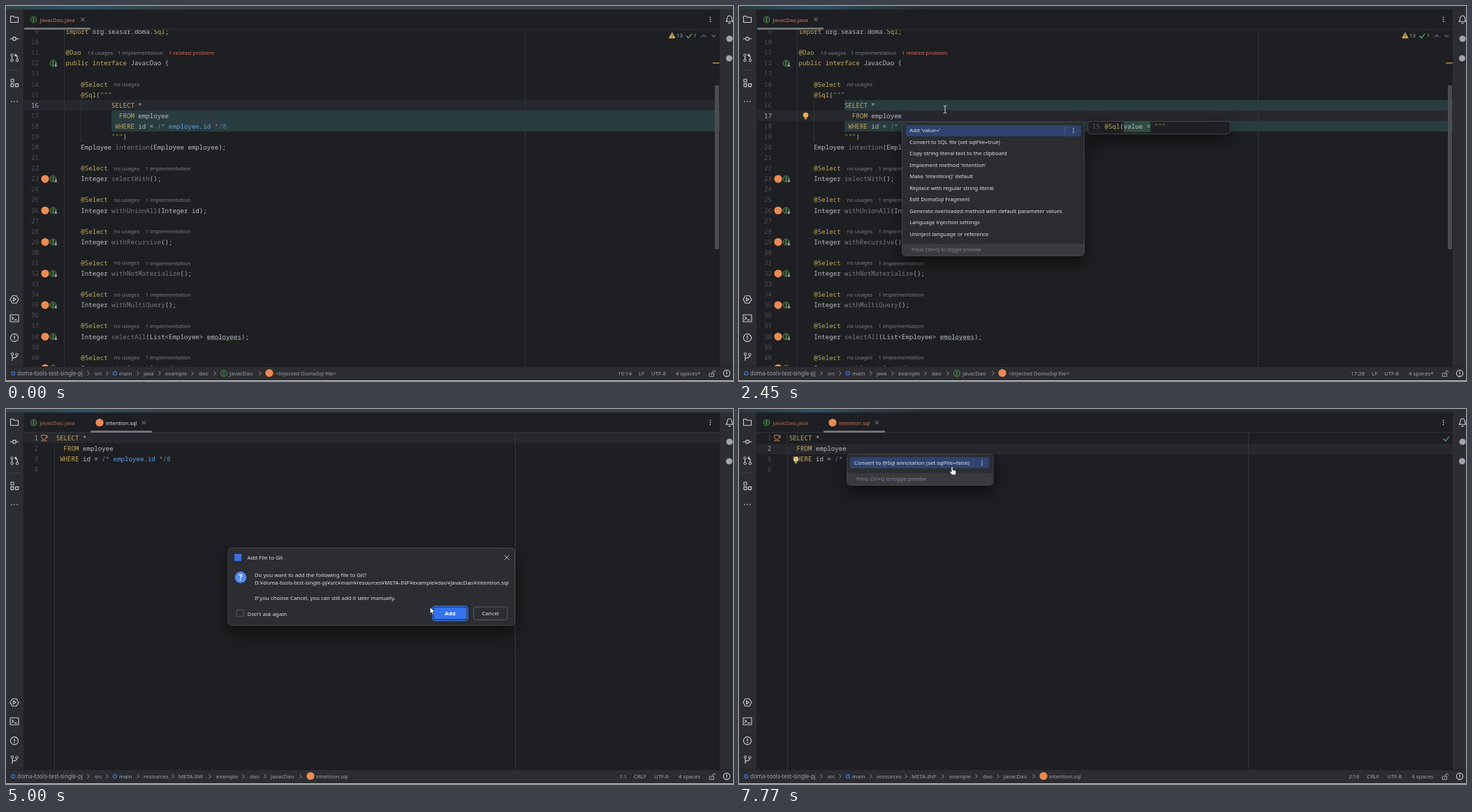
These frames come from a looping animation (1041x538 px, 8 s). An HTML page:

```html
<!DOCTYPE html>
<html lang="en">
<head>
<meta charset="utf-8">
<title>Editor: convert annotation to SQL file</title>
<style>
html, body { margin: 0; width: 100%; height: 100%; overflow: hidden; background: #1e1f22; }
svg { display: block; width: 100%; height: 100%; }
text { white-space: pre; font-family: "Noto Sans", "Open Sans", sans-serif; }
.mono { font-family: "Noto Sans Mono", "DejaVu Sans Mono", monospace; font-size: 9.12px; }
.shadow { filter: drop-shadow(0 10px 11px #0008); }
</style>
</head>
<body>
<svg id="stage" viewBox="0 0 1041 538" xmlns="http://www.w3.org/2000/svg"></svg>
<script>
const LOOP = 8000, PITCH = 15.083;
const BG = '#1e1f22', PANEL = '#2b2d30', EDGE = '#43454a', ROW = '#26282e', TEAL = '#293c3f',
  ICON = '#ced0d6', TEXT = '#dfe1e5', DIM = '#7b7f86', MUTED = '#a0a3ab', BLUE = '#3574f0',
  ORANGE = '#ee8a50', RED = '#cf7b68', GREEN = '#57965c', YELLOW = '#d6ae58';
const INK = { k: '#c8a95f', a: '#b9ab5c', s: '#9c9a5c', m: '#777a80', c: '#7a7e85', b: '#5b9fe6', n: '#4a86a8', d: '#bcbec4' };

const esc = s => s.replace(/&/g, '&amp;').replace(/</g, '&lt;');
const rect = (x, y, w, h, fill, r = 0, more = '') =>
  `<rect x="${x}" y="${y}" width="${w}" height="${h}" rx="${r}" fill="${fill}" ${more}/>`;
const box = (x, y, w, h, fill, stroke, r) => rect(x, y, w, h, fill, r, `stroke="${stroke}"`);
const path = (d, color = ICON, width = 1.1, fill = 'none') =>
  `<path d="${d}" fill="${fill}" stroke="${color}" stroke-width="${width}" stroke-linecap="round" stroke-linejoin="round"/>`;
const circle = (x, y, r, fill, stroke = 'none', width = 1, more = '') =>
  `<circle cx="${x}" cy="${y}" r="${r}" fill="${fill}" stroke="${stroke}" stroke-width="${width}" ${more}/>`;
const at = (x, y, body) => `<g transform="translate(${x} ${y})">${body}</g>`;
// Text is placed by its left end and its vertical middle.
const label = (x, y, s, fill = TEXT, size = 7.8, more = '') =>
  `<text x="${x}" y="${y + size * 0.36}" font-size="${size}" fill="${fill}" ${more}>${esc(s)}</text>`;
// Code spans: "k~keyword |plain |a~annotation"
const code = (x, y, s) => `<text class="mono" x="${x}" y="${y + 3.2}">` + s.split('|').map(part => {
  const [ink, words] = part.includes('~') ? part.split('~') : ['d', part];
  return `<tspan fill="${INK[ink]}">${esc(words)}</tspan>`;
}).join('') + '</text>';
const lineNo = (y, n, fill = '#4b5059', x = 47) =>
  `<text class="mono" x="${x}" y="${y + 3.2}" text-anchor="end" fill="${fill}">${n}</text>`;
// Shows its content only within the given "start-end" spans (ms).
const during = (spans, body) => `<g data-on="${spans}">${body}</g>`;

const cross = (x, y, r = 2.3, color = '#9da0a8') => path(`M${x - r} ${y - r}l${2 * r} ${2 * r}m0 ${-2 * r}l${-2 * r} ${2 * r}`, color, 0.9);
const chevron = (x, y) => path(`M${x - 1.3} ${y - 2.7}l2.6 2.7l-2.6 2.7`, '#9da0a8', 0.9);
const dots = (x, y, dx, dy, gap = 3) => [-gap, 0, gap].map(k => circle(x + k * dx, y + k * dy, 0.85, ICON)).join('');
const check = (x, y) => path(`M${x - 3.5} ${y}l2.6 2.8l4.8 -5.6`, '#57a75e', 1.3);
const badge = (x, y, r = 5.6) => circle(x, y, r, ORANGE);
const iface = (x, y) => circle(x, y, 4.4, '#253627', GREEN, 0.9) + path(`M${x - 1.1} ${y - 2}h2.2m-1.1 0v4m-1.1 0h2.2`, GREEN, 0.8);
const implemented = y => iface(67.5, y) + path(`M71.5 ${y}v4.5m-1.6 -1.6l1.6 1.6l1.6 -1.6`, ICON, 0.9);
const bulb = (x, y, color) => circle(x, y - 1, 3.8, color) + rect(x - 1.7, y + 2, 3.4, 2.9, color, 0.8) + path(`M${x - 1.5} ${y + 3.4}h3`, BG, 0.6);

function sideBars() {
  const left = [
    [19, path('M-5.5 -4.5h3.8l1.7 1.8h5.5v7.2h-11z')],
    [47, circle(0, 0, 2.4, 'none', ICON, 1.1) + path('M-6 0h3.4m5.2 0h3.4')],
    [74, circle(-3.5, -3.5, 1.7, 'none', ICON) + circle(-3.5, 4, 1.7, 'none', ICON) + circle(4, 4, 1.7, 'none', ICON) + path('M-3.5 -1.6v3.8m7.5 0v-3.5q0 -2.3 -3.2 -2.3m1.6 -1.7l-1.8 1.7l1.8 1.7')],
    [110, path('M-5 -5h4v4h-4zM-5 1.6h4v4h-4zM1.6 1.6h4v4h-4z')],
    [137, dots(0, 0, 1, 0, 4.2)],
    [421, path('M-3 -5.3h6l3 5.3l-3 5.3h-6l-3 -5.3zM-1.5 -2.4l3.8 2.4l-3.8 2.4z')],
    [448, path('M-6 -5h12v10h-12zM-3.5 -2l2.2 2l-2.2 2m3.7 .4h3')],
    [476, circle(0, 0, 5.6, 'none', ICON, 1.1) + path('M0 -2.9v3.4m0 2v.2', ICON, 1.3)],
    [503, circle(-3, -3.7, 1.7, 'none', ICON) + circle(3.4, -3, 1.7, 'none', ICON) + path('M-3 -2v7.5m6.4 -6.8q0 3.3 -6.4 3.3')]
  ];
  return rect(0, 5, 25, 512, PANEL) + rect(1022, 5, 19, 512, PANEL) +
    path('M4 92h15', EDGE, 1) + left.map(([y, icon]) => at(12, y, icon)).join('') +
    at(1036, 19, path('M-5 3.3h10q-1.7 -1.5 -1.7 -4.3q0 -4 -3.3 -4t-3.3 4q0 2.8 -1.7 4.3zM-1.2 5.6h2.4')) +
    circle(1036, 47, 4.6, MUTED) + circle(1035.5, 75, 4.6, MUTED) + dots(1008.5, 19.3, 0, 1);
}

function titleBar() {
  return `<linearGradient id="glow"><stop offset="0" stop-color="#2d4550" stop-opacity=".5"/><stop offset=".4" stop-color="#2d5162"/><stop offset="1" stop-color="#2d4550" stop-opacity="0"/></linearGradient>` +
    rect(0, 0, 1041, 5, PANEL) + during('0-600 3900-5280', rect(0, 0, 1041, 5, '#3b3e41')) + rect(0, 0, 270, 5, 'url(#glow)');
}

function underline(x, w, focused) {
  return rect(x, 31, w, 3, '#6f737a', 1) + during(focused, rect(x, 31, w, 3, BLUE, 1));
}

function javaEditor() {
  const row = n => 52 + PITCH * (n - 10), top = n => Math.round(row(n) - PITCH / 2), X = 85.5;
  const band = (n, x, fill) => rect(x, top(n), 1022 - x, top(n + 1) - top(n), fill);
  const lines = {
    9: 'k~import |org.seasar.doma.|a~Sql|;', 11: 'a~@Dao', 12: 'k~public interface |JavacDao {',
    14: 'a~    @Select', 15: 'a~    @Sql|(|s~"""', 16: 'k~            SELECT |*',
    17: 'k~              FROM |employee', 18: 'k~             WHERE |id = |c~/* |b~employee|.|b~id |c~*/|n~0',
    19: 's~            """|)', 20: '    Employee |m~intention|(Employee employee);'
  };
  const methods = ['selectWith|()', 'withUnionAll|(Integer id)', 'withRecursive|()', 'withNotMaterialize|()',
    'withMultiQuery|()', 'selectAll|(List<Employee> emoloyees)', 'withSearchQuery|()'];
  let out = [16, 17, 18].map(n => band(n, 151, TEAL)).join('') +
    during('0-650', band(16, 26, ROW)) + during('650-3780', band(17, 26, ROW)) +
    path('M83.5 34V517', '#313438', 1) + path('M743.5 34V517', '#36383d', 1) +
    path(`M107.5 ${top(16)}V${top(20)}`, '#313438', 1);
  for (let n = 9; n <= 41; n++) out += lineNo(row(n), n);
  out += during('0-650', lineNo(row(16), 16, MUTED)) + during('650-3780', lineNo(row(17), 17, MUTED));
  for (const n in lines) out += code(X, row(+n), lines[n]);
  out += label(116.5, row(11), '13 usages', DIM) + label(160, row(11), '1 implementation', DIM) +
    label(233, row(11), '1 related problem', '#db6a58') + label(154.5, row(14), 'no usages', DIM, 7.65) + implemented(row(12));
  methods.forEach((name, i) => {
    const n = 23 + 3 * i, y = row(n), above = row(n - 1);
    out += code(X, above, 'a~    @Select') + label(154.5, above, 'no usages', DIM, 7.65) +
      label(199.5, above, '1 implementation', DIM) + code(X, y, `    Integer |m~${name};`) + badge(56, y) + implemented(y);
  });
  out += path(`M288.5 ${row(38) + 5}` + 'l1.5 -1.4l1.5 1.4'.repeat(16), '#4f8f55', 0.8) +
    path('M954 38.6l4 7.3h-8z', YELLOW, 1, YELLOW) + path('M954 41v2.2m0 1.6v.1', BG, 0.9) + label(960, 42.5, '13', MUTED) +
    check(978, 43) + label(984.5, 42.5, '1', MUTED) + path('M996.5 44l2.6 -2.5l2.6 2.5M1010.7 41.8l2.6 2.5l2.6 -2.5', MUTED, 1) +
    rect(1012, 81, 9.5, 1.6, '#a98b45') + rect(1015, 114, 6, 235, '#4b4d50') +
    rect(26, 5, 996, 28, BG) + path('M26 33.5H1022', '#2f3135', 1) +
    iface(39.5, 19.5) + label(48.5, 20, 'JavacDao.java', RED) + cross(110, 19.5) + underline(26, 95, '600-1600') +
    during('650-1500', rect(233, top(17) + 1, 1, 13, ICON)) + during('1500-3780', bulb(95.5, row(17), '#f0ae4b'));
  return out;
}

function sqlEditor() {
  const row = n => 42 + PITCH * (n - 1);
  const current = (n, spans) => during(spans, rect(26, Math.round(row(n) - PITCH / 2), 996, 15, ROW) + lineNo(row(n), n, MUTED, 46));
  const lines = ['k~SELECT |*', 'k~  FROM |employee', 'k~ WHERE |id = |c~/* |b~employee|.|b~id |c~*/|n~0', ''];
  return rect(26, 5, 996, 512, BG) + lines.map((s, i) => lineNo(row(i + 1), i + 1, undefined, 46)).join('') +
    current(1, '3780-5980') + current(2, '5980-8000') +
    path('M69.5 34V517', '#313438', 1) + path('M729.5 34V517', '#36383d', 1) +
    lines.map((s, i) => code(71.7, row(i + 1), s)).join('') +
    during('4600-8000', path('M51 37.5h6.3v3.8q0 2.2 -2 2.2h-2.3q-2 0 -2 -2.2zM57.3 38.5h2v2.6h-2M50.5 45.5h7.5', '#c77d55', 1)) +
    during('5280-8000', check(1012.5, 43)) +
    path('M26 33.5H1022', '#2f3135', 1) +
    iface(39.5, 19.5) + label(48.5, 20, 'JavacDao.java', '#b06e60') + badge(134, 19.5) +
    during('3780-5280', label(143, 20, 'intention.sql', TEXT, 7.6)) + during('5280-8000', label(143, 20, 'intention.sql', RED, 7.6)) +
    cross(197.5, 19.5) + underline(121, 88, '3780-3900 5300-6890') +
    during('5300-5980', rect(71.5, 36, 1, 12, ICON)) + during('5980-6890', rect(154, 51, 1, 12, ICON));
}

function statusBar() {
  const y = 527, text = (x, s) => label(x, y, s, MUTED);
  const crumbs = (names, arrows) => names.map(([x, s]) => text(x, s)).join('') + arrows.map(x => chevron(x, y)).join('');
  const module = x => box(x, y - 2.3, 4.6, 4.6, '#25324d', '#548af7', 1);
  return rect(0, 517, 1041, 20, PANEL) + path('M0 517.5H1041', BG, 1) + rect(0, 537, 1041, 1, '#c4c6c8') +
    module(8) + label(16, y, 'doma-tools-test-single-pj', MUTED, 8) + module(153.5) +
    crumbs([[127, 'src'], [162, 'main']], [118, 145, 189]) +
    during('0-3780', crumbs([[197, 'java'], [228, 'example'], [276, 'dao'], [320, 'JavacDao'], [386, '<Injected DomaSql file>']],
      [220, 267, 299, 364]) + iface(312, y) + badge(377, y - 0.5)) +
    during('3780-8000', crumbs([[197, 'resources'], [247, 'META-INF'], [301, 'example'], [349, 'dao'], [379, 'JavacDao'], [444, 'intention.sql']],
      [239, 292, 340, 371, 422]) + badge(436, y - 0.5)) +
    during('0-650', text(876, '16:14')) + during('650-3780', text(876, '17:28')) + during('3780-4600', text(885.5, '1:1')) +
    during('4600-6080', text(878, '1:1')) + during('6080-8000', text(873, '2:16')) +
    during('0-4600', text(906, 'LF') + text(924, 'UTF-8') + text(959, '4 spaces*')) +
    during('4600-8000', text(899, 'CRLF') + text(928, 'UTF-8') + text(963, '4 spaces')) +
    during('3850-4600', label(649, y, 'D:¥doma-tools-test-single-pj', MUTED, 8) + rect(761, 526, 100, 2.6, '#548af7', 1.3) +
      circle(870.5, y, 5, '#55585e') + cross(870.5, y, 1.9)) +
    path('M1007.5 527h6v4.5h-6zM1012 527v-2q0 -1.8 1.8 -1.8t1.8 1.8M1010.5 529v.6', MUTED, 1) +
    circle(1032, y, 4.6, 'none', ICON, 1.1) + path('M1032 524.6v2.9m0 1.7v.1', ICON, 1.2);
}

function selection(x, y, w, divider) {
  return rect(x, Math.round(y - 8), w, 16, '#2e436e', 3) + path(`M${divider} ${y - 5.5}v11`, '#4b5f8a', 0.8) + dots(divider + 12.4, y, 0, 1);
}

function panel(x, y, w, h) {
  const foot = y + h - 17.5;
  return `<g class="shadow">${box(x, y, w, h, PANEL, EDGE, 5)}</g>` +
    `<path d="M${x + .5} ${foot}h${w - 1}v12.5q0 4.5 -4.5 4.5h${10 - w}q-4.5 0 -4.5 -4.5z" fill="#393b40"/>` +
    label(x + 13.5, foot + 8.7, 'Press Ctrl+Q to toggle preview', '#868a91', 7);
}

function actionMenu() {
  const items = ["Add 'value='", 'Convert to SQL file (set sqlFile=true)', 'Copy string literal text to the clipboard',
    "Implement method 'intention'", "Make 'intention()' default", 'Replace with regular string literal', 'Edit DomaSql Fragment',
    'Generate overloaded method with default parameter values', 'Language injection settings', 'Uninject language or reference'];
  const row = i => 178.5 + 16.48 * i;
  const preview = `<g class="shadow">${box(499.5, 165.5, 204, 18, BG, EDGE, 4)}</g>` + rect(551, 166, 38.5, 15, '#2f4a42') +
    lineNo(173, 15, '#5a5e66', 517) + code(523.5, 173, 'a~@Sql|(value = |s~"""');
  return during('1600-3710', panel(233.5, 166.5, 261, 192) + during('1600-2730', selection(239, row(0), 251, 466.5)) +
    during('2730-3710', selection(239, row(1), 251, 466.5)) + items.map((s, i) => label(244.3, row(i), s, TEXT, 7.75)).join('')) +
    during('1750-2730', preview);
}

function convertMenu() {
  return during('6890-8000', bulb(81.5, 73, '#d9bd82') + panel(154.5, 64.5, 209.5, 45) +
    selection(159, 77.3, 199.5, 335.5) + label(165, 77.5, 'Convert to @Sql annotation (set sqlFile=false)'));
}

function gitDialog() {
  return during('3900-5280', `<g class="shadow">${box(318, 199.5, 410.5, 111, PANEL, EDGE, 5)}</g>` +
    rect(327, 208, 10, 10, '#3c6fe0') + label(345.5, 213, 'Add File to Git') + cross(717, 213, 3, ICON) +
    circle(336, 241.5, 8.2, '#548af7') + label(336, 241.5, '?', '#fff', 11.5, 'text-anchor="middle" font-weight="600"') +
    label(356, 238, 'Do you want to add the following file to Git?') +
    label(356, 249, 'D:¥doma-tools-test-single-pj¥src¥main¥resources¥META-INF¥example¥dao¥JavacDao¥intention.sql') +
    label(356, 271, 'If you choose Cancel, you can still add it later manually.') +
    box(330, 288, 10, 10, 'none', '#5a5d63', 2) + label(345.7, 293.7, "Don't ask again") +
    rect(610.7, 283, 50.6, 20.4, 'none', 4, `stroke="${BLUE}" stroke-width="1.5"`) + rect(612.5, 284.8, 47, 16.8, BLUE, 3) +
    label(636, 293.5, 'Add', '#fff', 7.8, 'text-anchor="middle" font-weight="600"') +
    box(669.5, 284, 48.5, 18.5, PANEL, '#5a5d63', 3) + label(693.7, 293.5, 'Cancel', TEXT, 7.8, 'text-anchor="middle"'));
}

function pointer() {
  const hand = 'M-1 1q0 -1.3 1 -1.3t1 1.3v3.4l3.6 .8q1.3 .4 1.2 1.7l-.8 4.6h-5l-3.2 -4q-.3 -1.2 .9 -1l1.3 .8z';
  return '<g id="pointer">' + during('620-760 3580-3710 5210-5300 5940-6010', circle(0, 0, 8.5, '#e0cc1c', 'none', 0, 'opacity=".75"')) +
    during('120-2710 5650-7690', path('M-2 -5.3q2 0 2 1v8.6q0 1 -2 1m4 -10.6q-2 0 -2 1m0 8.6q0 1 2 1', '#e6e6e6', 0.9)) +
    during('2710-3710 7690-8000', path(hand, '#222', 0.6, '#fff')) +
    during('3710-5650', path('M0 0v9l2.1 -2l1.5 3.3l1.5 -.7l-1.5 -3.1h2.8z', '#222', 0.6, '#fff')) + '</g>';
}

const stage = document.getElementById('stage');
stage.innerHTML = rect(0, 0, 1041, 538, BG) + during('0-3780', javaEditor()) + during('3780-8000', sqlEditor()) +
  titleBar() + sideBars() + statusBar() + actionMenu() + convertMenu() + gitDialog() + during('120-8000', pointer());

// Pointer stops: time, x, y
const stops = [[120, 420, 300], [620, 268, 157], [1170, 268, 157], [1370, 268, 144], [1910, 285, 143], [1980, 285, 143],
  [2450, 295, 148.5], [2780, 318.5, 190], [4390, 319, 190], [5140, 636, 294], [5300, 636, 294], [5870, 170, 62],
  [6080, 170, 62], [6220, 465, 149], [7570, 465, 149], [7770, 305, 83], [LOOP, 305, 83]];
const ease = p => p * p * (3 - 2 * p);

function pointerAt(t) {
  const i = Math.max(1, stops.findIndex(s => s[0] > t));
  const [t0, x0, y0] = stops[i - 1], [t1, x1, y1] = stops[i];
  const p = ease(Math.min(1, Math.max(0, (t - t0) / (t1 - t0))));
  return [x0 + (x1 - x0) * p, y0 + (y1 - y0) * p];
}

const timed = [...stage.querySelectorAll('[data-on]')].map(el => ({
  el, spans: el.dataset.on.split(' ').map(span => span.split('-').map(Number))
}));
const mouse = document.getElementById('pointer');
const start = performance.now();

function draw() {
  const t = (performance.now() - start) % LOOP;
  for (const { el, spans } of timed) el.style.display = spans.some(([a, b]) => t >= a && t < b) ? '' : 'none';
  mouse.setAttribute('transform', `translate(${pointerAt(t).join(' ')})`);
  requestAnimationFrame(draw);
}
draw();
</script>
</body>
</html>
```
